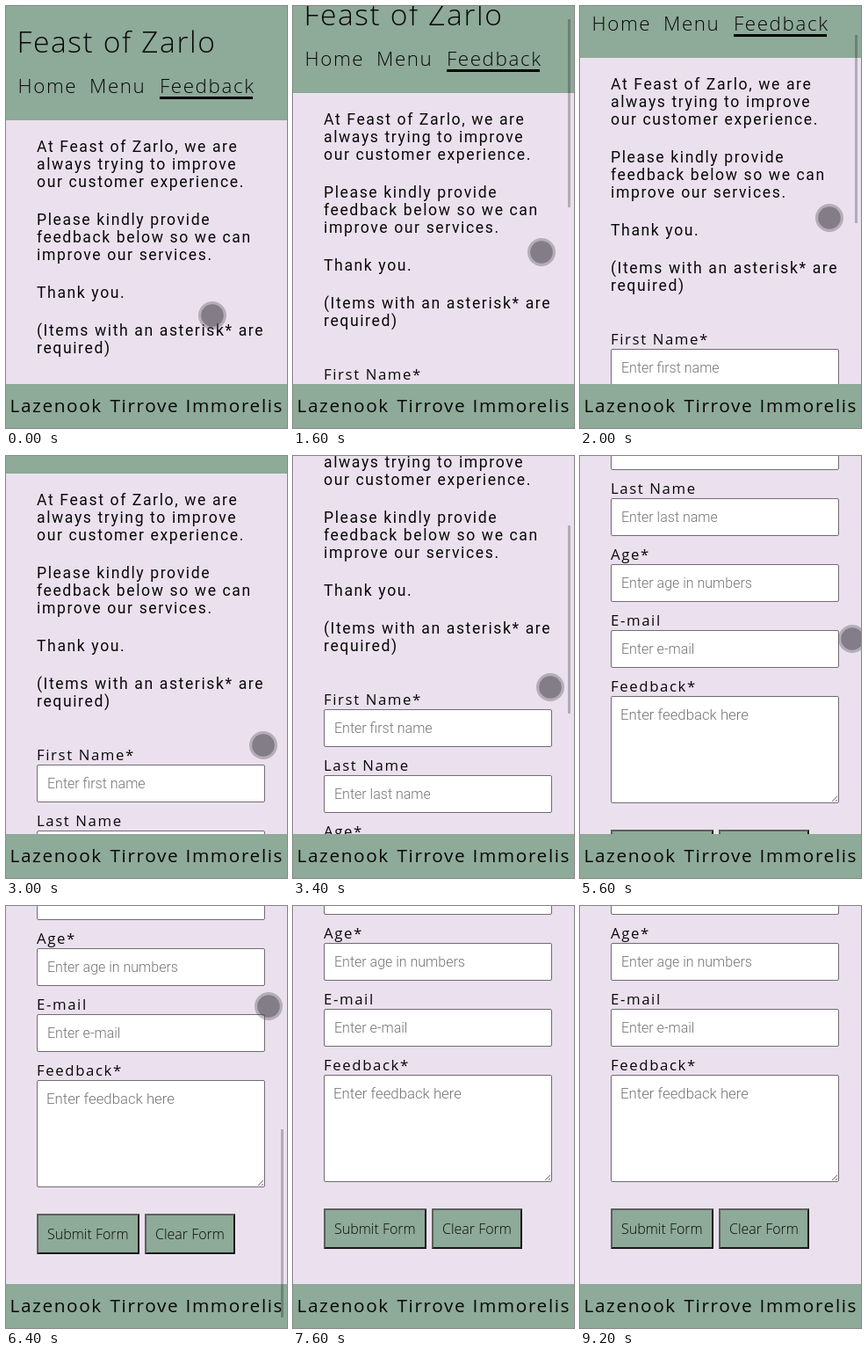
Recreate the animation shown at these times as an HTML page. Size 320 px wide and 480 px high, loop 9.4 s.

```html
<!DOCTYPE html>
<html lang="en">
<head>
<meta charset="utf-8">
<title>Feedback form</title>
<style>
  html, body { margin: 0; width: 100%; height: 100%; overflow: hidden; background: #ebe1ee; }
  svg { display: block; width: 100vw; height: 100vh; }
  text { fill: #080808; font-family: "Open Sans", sans-serif; letter-spacing: 1.6px; }
  .title { font-size: 33.6px; font-weight: 300; }
  .nav { font-size: 22.4px; font-weight: 300; }
  .body { font: 17.6px Roboto, sans-serif; }
  .label { font-size: 16.8px; }
  .hint { font: 300 16px Roboto, sans-serif; letter-spacing: 0; fill: #757575; }
  .big { font-size: 16.8px; }
  .btn { font-size: 16px; font-weight: 300; letter-spacing: 0; }
  .foot { font-size: 20.8px; }
  .green { fill: #8eaa98; }
  .field { fill: #fff; stroke: #706c72; }
</style>
</head>
<body>
<svg viewBox="0 0 320 480">
  <rect width="320" height="480" fill="#ebe1ee"/>
  <g id="page"></g>
  <g id="footer"></g>
  <rect id="thumb" x="313" width="3" height="214" fill="#000" opacity=".24"/>
  <g id="touch" fill="#55505a">
    <circle r="16" opacity=".36"/>
    <circle r="12.8" opacity=".52"/>
  </g>
</svg>
<script>
const LOOP = 9400, STEP = 200;
const $ = id => document.getElementById(id);
const text = (cls, x, y, s) => `<text class="${cls}" x="${x}" y="${y}">${s}</text>`;
const box = (cls, x, y, w, h) => `<rect class="${cls}" x="${x}" y="${y}" width="${w}" height="${h}"/>`;
const field = (y, h) =>
  `<rect class="field" x="35.5" y="${y + .5}" width="259" height="${h - 1}" rx="1.5"/>`;

// Button with an outset border
const button = (x, w, s) => {
  const y = 913, h = 46;
  return box('green', x, y, w, h) +
    `<path fill="#5c605d" d="M${x} ${y + h}v${-h}h${w}l-2 2h${4 - w}v${h - 4}z"/>` +
    `<path fill="#181818" d="M${x} ${y + h}h${w}v${-h}l-2 2v${h - 4}h${4 - w}z"/>` +
    text('btn', x + 12, 942, s);
};

const paragraphs = [
  ['At Feast of Zarlo, we are', 'always trying to improve', 'our customer experience.'],
  ['Please kindly provide', 'feedback below so we can', 'improve our services.'],
  ['Thank you.'],
  ['(Items with an asterisk* are', 'required)']
];
const fields = [
  ['First Name*', 'Enter first name'],
  ['Last Name', 'Enter last name'],
  ['Age*', 'Enter age in numbers'],
  ['E-mail', 'Enter e-mail']
];

function buildPage() {
  let out = box('green', 0, 0, 320, 130) +
    text('title', 12.5, 53, 'Feast of Zarlo') +
    text('nav', 13.5, 98.5, 'Home') + text('nav', 95, 98.5, 'Menu') +
    text('nav', 175, 98.5, 'Feedback') + box('', 175, 103, 106, 3);
  let y = 166;
  for (const lines of paragraphs) {
    for (const line of lines) {
      out += text('body', 35, y, line);
      y += 20;
    }
    y += 23;
  }
  fields.forEach(([label, hint], i) => {
    const top = 461 + 75 * i;
    out += text('label', 35, top - 5, label) + field(top, 43) + text('hint', 47, top + 27, hint);
  });
  return out + text('label', 35, 756, 'Feedback*') + field(761, 122) +
    text('hint big', 46, 788, 'Enter feedback here') +
    '<path d="M287 881l6-6M291 881l2-2" stroke="#706c72"/>' +
    button(35, 117, 'Submit Form') + button(158, 103, 'Clear Form');
}

$('page').innerHTML = buildPage();
$('footer').innerHTML = box('green', 0, 430, 320, 50) +
  text('foot', 4.5, 462, 'Lazenook') + text('foot', 118.5, 462, 'Tirrove') +
  text('foot', 204.5, 462, 'Immorelis');

// Keys: time, then values
const scrollKeys = [
  [1150, 0], [1600, 31], [2400, 110], [3000, 110], [4000, 267],
  [4400, 267], [5200, 488], [5800, 488], [6400, 563], [6500, 569]
];
const touchKeys = [
  [0, 235, 352], [400, 286, 319], [1100, 286, 319], [1600, 283, 280], [2400, 285, 201],
  [3000, 293, 329], [4000, 294, 164], [4400, 297, 280], [5200, 302, 51],
  [5600, 310, 208], [5700, 310, 208], [6400, 299, 114], [7000, 304, 31]
];

function sample(keys, t) {
  const n = keys.findIndex(k => k[0] > t);
  if (n === 0) return keys[0].slice(1);
  if (n < 0) return keys[keys.length - 1].slice(1);
  const a = keys[n - 1], b = keys[n];
  const u = (t - a[0]) / (b[0] - a[0]);
  return a.slice(1).map((v, i) => v + (b[i + 1] - v) * u);
}

const scrollAt = t => Math.round(sample(scrollKeys, t)[0]);

function draw(now) {
  const t = Math.floor((now % LOOP) / STEP) * STEP;
  const scroll = scrollAt(t);
  const [x, y] = sample(touchKeys, t);
  $('page').setAttribute('transform', `translate(0 ${-scroll})`);
  $('thumb').setAttribute('y', Math.round(1 + scroll * .449));
  $('thumb').style.display = scroll !== scrollAt(t - STEP) ? '' : 'none';
  $('touch').setAttribute('transform', `translate(${Math.round(x)} ${Math.round(y)})`);
  $('touch').setAttribute('opacity', t < 7400 ? 1 : t < 7600 ? .45 : 0);
}

function tick() {
  draw(performance.now());
  requestAnimationFrame(tick);
}
tick();
</script>
</body>
</html>
```
